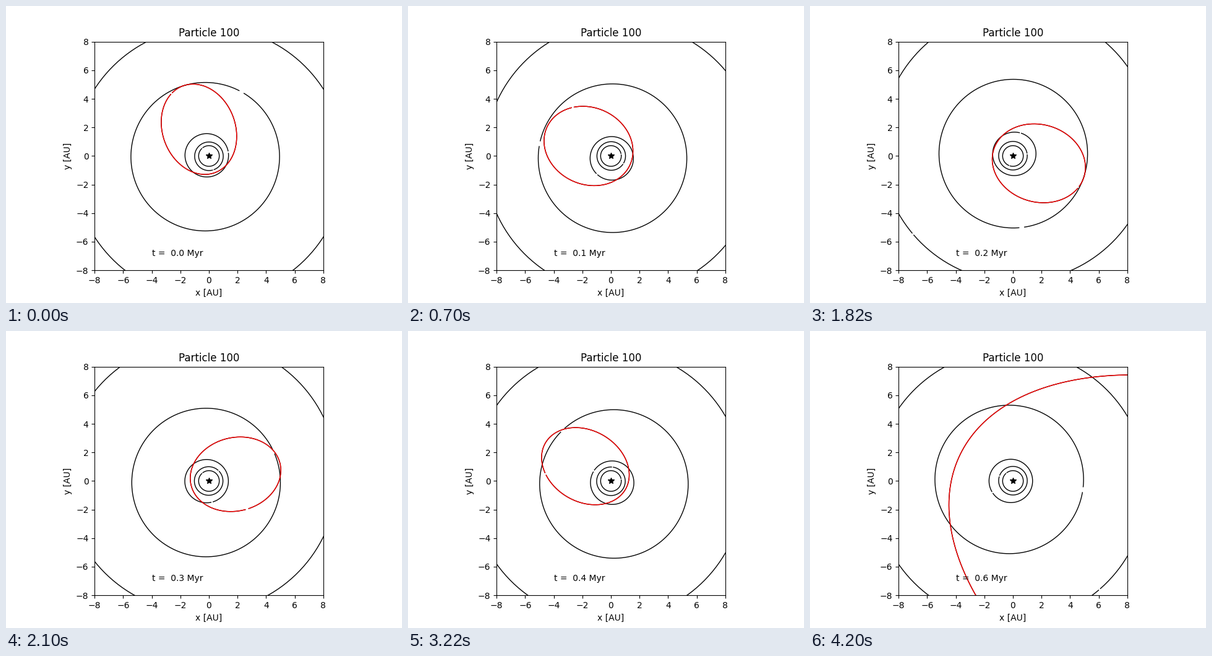
Recreate the animation shown at these times as a matplotlib script. Size 640x480 px, loop 4900 ms.

```python
import numpy as np
import matplotlib.pyplot as plt
from matplotlib.animation import FuncAnimation

STEPS = 7
GAP = 3.6  # degrees of mean anomaly left open on each orbit

# Slow precession modes shared by the two giants, in degrees per step
G_SLOW, G_FAST = 114, 56.5

# Semi-major axis, (start, rate) of the mean longitude, gap, and the
# eccentricity modes as (amplitude, phase, rate)
PLANETS = [
    (0.723, (130, 240), GAP, []),
    (1.0, (288, 39), GAP, [(0.02, 90, 90)]),
    (1.524, (6, 214.9), GAP, [(0.104, -10, 122.5), (0.013, -100, 177.5)]),
    (5.2, (58.5, 108.8), GAP, [(0.046, 27.4, G_SLOW), (0.0148, -52, G_FAST)]),
    (9.54, (-2.5, 292.6), 0.7, [(0.035, 29.6, G_SLOW), (0.0458, 132, G_FAST)]),
]

# The particle is scattered chaotically, so each step is a key pose:
# semi-major axis, eccentricity, periapsis, mean anomaly
PARTICLE = [
    (3.235, 0.617, -69.5, 214),
    (3.19, 0.539, -24.0, 108),
    (3.30, 0.570, 164.2, 151),
    (3.204, 0.599, 194.2, 59),
    (3.237, 0.638, -30.1, 256),
    (3.20, 0.696, 261.3, 318),
    (23.74, 0.826, 154.8, 180),
]


def turn(degrees):
    return np.exp(1j * np.radians(degrees))


def eccentric_anomaly(mean, e):
    """Solve Kepler's equation by Newton's method."""
    angle = mean + e * np.sin(mean)
    for _ in range(12):
        angle -= (angle - e * np.sin(angle) - mean) / (1 - e * np.cos(angle))
    return angle


def orbit(a, e, peri, mean, gap=GAP):
    """Ellipse with one focus at the star, open where the body is."""
    ends = np.radians([mean + gap / 2, mean + 360 - gap / 2])
    t = np.linspace(*eccentric_anomaly(ends, e), 300)
    path = np.cos(t) - e + 1j * np.sqrt(1 - e * e) * np.sin(t)
    path = a * path * turn(peri)
    return path.real, path.imag


def planet_orbit(step, a, longitude, gap, modes):
    start, rate = longitude
    vector = sum(amp * turn(phase + g * step) for amp, phase, g in modes)
    peri = np.degrees(np.angle(vector))
    return orbit(a, abs(vector), peri, start + rate * step - peri, gap)


fig = plt.figure(figsize=(6.4, 4.8), dpi=100)
ax = fig.add_subplot(111)
ax.set_aspect("equal")
ax.set(xlim=(-8, 8), ylim=(-8, 8),
       xticks=range(-8, 9, 2), yticks=range(-8, 9, 2),
       xlabel="x [AU]", ylabel="y [AU]", title="Particle 100")


def add_line(color):
    return ax.plot([], [], color=color, lw=1, solid_capstyle="butt")[0]


planet_lines = [add_line("black") for _ in PLANETS]
# The particle's red path lies on top of a black one
particle_lines = [add_line("black"), add_line("red")]
ax.plot(0, 0, "k*", markersize=7, zorder=3)
clock = ax.text(-4, -7, "")


def update(step):
    for line, planet in zip(planet_lines, PLANETS):
        line.set_data(*planet_orbit(step, *planet))
    for line in particle_lines:
        line.set_data(*orbit(*PARTICLE[step]))
    clock.set_text(f"t =  {step / 10:.1f} Myr")
    return planet_lines + particle_lines + [clock]


anim = FuncAnimation(fig, update, frames=STEPS, interval=700,
                     repeat=True, repeat_delay=0, blit=False)
plt.show()
```
